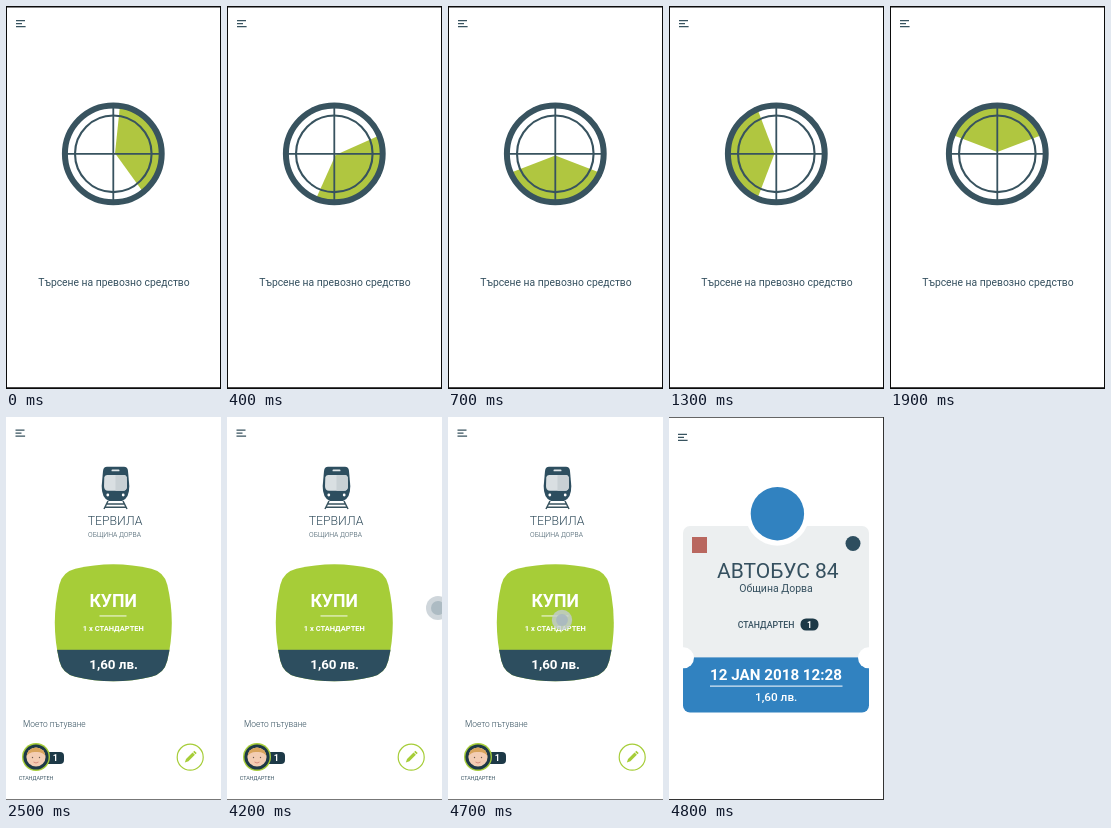
Write an HTML page that moves like this. It is 215x383 px and loops after 6000 ms.

```html
<!DOCTYPE html>
<html lang="bg">
<head>
<meta charset="utf-8">
<title>Билет за превоз</title>
<style>
  html, body { margin: 0; width: 100%; height: 100%; overflow: hidden; background: #fff; }
  svg { display: block; width: 100vw; height: 100vh; }
  text { font-family: Roboto, Inter, sans-serif; text-anchor: middle; fill: #35505f; }
  .light { font-weight: 300; }
  .mid { font-weight: 500; }
  .bold { font-weight: 700; }
  .white { fill: #fff; }
  .left { text-anchor: start; }
  .dark { fill: #2d4e5f; }
  .deep { fill: #1d3947; }
  .green { fill: #a6cd38; }
  .blue { fill: #3182c0; }
  .line { fill: none; stroke: #38535f; }
</style>
</head>
<body>
<svg viewBox="0 0 215 383">
  <defs>
    <path id="menu" d="M0 0H9M0 3H6M0 6H9.6" class="line" stroke-width="1.3"/>
    <clipPath id="dial"><circle cx="107.3" cy="147.8" r="46.5"/></clipPath>
    <clipPath id="buy">
      <path transform="translate(107.3 205.7)" d="M-38 -54Q0 -63 38 -54Q50.9 -50.9 54 -38Q63 0 54 38Q50.9 50.9 38 54Q0 63 -38 54Q-50.9 50.9 -54 38Q-63 0 -54 -38Q-50.9 -50.9 -38 -54Z"/>
    </clipPath>
    <clipPath id="card"><rect x="14" y="109" width="186" height="186.5" rx="7"/></clipPath>
    <clipPath id="face"><circle cx="30" cy="340" r="9.6"/></clipPath>
  </defs>

  <g id="search">
    <use href="#menu" x="10" y="14.7"/>
    <g clip-path="url(#dial)"><path id="wedge" fill="#b0c640"/></g>
    <g class="line">
      <path d="M61 147.8H154M107.3 101V195" stroke-width="1.8"/>
      <circle cx="107.3" cy="147.8" r="38.3" stroke-width="2.1"/>
      <circle cx="107.3" cy="147.8" r="48.4" stroke-width="6"/>
    </g>
    <text x="108" y="280" font-size="10.35">Търсене на превозно средство</text>
    <path d="M0 0H215V383H0ZM1 1.5V381.3H214V1.5Z" fill-rule="evenodd" fill="#0b0b0b"/>
  </g>

  <g id="order">
    <use href="#menu" x="9.5" y="13.2"/>
    <g>
      <path d="M102 84L98 92M117 84L121 92M100.5 87H118.5M98.5 90.3H120.5" class="line" stroke-width="1.5"/>
      <path class="dark" d="M101 49.8H118Q121.5 49.8 122 54L123.3 69Q123.5 81 116 84H103Q95.5 81 95.7 69L97 54Q97.5 49.8 101 49.8Z"/>
      <rect x="105.5" y="52.5" width="8" height="1.8" rx=".9" fill="#dfe5e8"/>
      <path d="M101 58H118Q120.5 58 120.7 60.5L121 69Q121 73.5 117 73.8H102Q98 73.5 98 69L98.3 60.5Q98.5 58 101 58Z" fill="#d9dfe2"/>
      <path d="M109.5 58H118Q120.5 58 120.7 60.5L121 69Q121 73.5 117 73.8H109.5Z" fill="#c8d0d4"/>
      <circle cx="101.8" cy="78" r="1.4" fill="#fff"/>
      <circle cx="117.2" cy="78" r="1.4" fill="#fff"/>
    </g>
    <text class="light" x="109" y="108" font-size="12.3">ТЕРВИЛА</text>
    <text class="light" x="108.5" y="119.5" font-size="6.8">ОБЩИНА ДОРВА</text>

    <g clip-path="url(#buy)">
      <rect class="green" x="48" y="146" width="120" height="120"/>
      <rect class="dark" x="48" y="232.8" width="120" height="34"/>
    </g>
    <text class="bold white" x="107.2" y="190" font-size="17.7">КУПИ</text>
    <rect class="white" x="93.5" y="198.5" width="27" height=".9"/>
    <text class="bold white" x="107.3" y="214" font-size="7.5">1 х СТАНДАРТЕН</text>
    <text class="bold white" x="107.6" y="251.7" font-size="13.4">1,60 лв.</text>

    <text class="light left" x="17" y="310" font-size="8.4">Моето пътуване</text>
    <rect class="deep" x="36" y="335" width="22" height="12" rx="4"/>
    <text class="bold white" x="49.3" y="344.4" font-size="9">1</text>
    <circle class="green" cx="30" cy="340" r="14"/>
    <circle class="deep" cx="30" cy="340" r="12.6"/>
    <g clip-path="url(#face)">
      <rect x="19" y="329" width="22" height="22" fill="#f3cdb3"/>
      <path d="M20 340Q23 334.5 30 335Q37 334.5 40 340V328H20Z" fill="#d8a45c"/>
      <circle cx="26.5" cy="340.5" r=".7" fill="#6b5a50"/>
      <circle cx="33.5" cy="340.5" r=".7" fill="#6b5a50"/>
      <path d="M27.5 345Q30 347 32.5 345" fill="none" stroke="#d07f74" stroke-width=".8"/>
    </g>
    <text x="30" y="363" font-size="5.3">СТАНДАРТЕН</text>
    <circle cx="184.2" cy="340.2" r="13" fill="#fff" stroke="#a6cd38" stroke-width="1.2"/>
    <path class="green" transform="translate(184.2 340.2) rotate(45)" d="M-1.7 -7.5H1.7V-5.8H-1.7ZM-1.7 -5H1.7V4.2L0 7.6L-1.7 4.2Z"/>
    <rect y="382" width="215" height="1" fill="#777"/>
    <g id="touch">
      <circle r="12" fill="#c3ccd2" opacity=".8"/>
      <circle r="7" fill="#a9b8c0" opacity=".9"/>
    </g>
  </g>

  <g id="ticket">
    <use href="#menu" x="9" y="17.4"/>
    <g clip-path="url(#card)">
      <rect x="14" y="109" width="186" height="133" fill="#eceff0"/>
      <rect class="blue" x="14" y="240.4" width="186" height="56"/>
    </g>
    <g class="white">
      <circle cx="14.5" cy="240.8" r="10.5"/>
      <circle cx="199.5" cy="240.8" r="10.5"/>
      <circle cx="108.4" cy="96.7" r="32"/>
    </g>
    <circle class="blue" cx="108.4" cy="96.7" r="26.7"/>
    <rect x="23" y="120" width="15" height="16" fill="#b9675f"/>
    <circle class="dark" cx="184" cy="126.5" r="7.5"/>
    <text x="108.8" y="160.7" font-size="21">АВТОБУС 84</text>
    <text x="107" y="175" font-size="10.5">Община Дорва</text>
    <text class="mid" x="97" y="211.2" font-size="8.7">СТАНДАРТЕН</text>
    <rect class="deep" x="131.5" y="201.4" width="18" height="12.2" rx="5.5"/>
    <text class="bold white" x="140.5" y="210.6" font-size="8.5">1</text>
    <text class="bold white" x="107" y="263.2" font-size="15.2">12 JAN 2018 12:28</text>
    <rect class="white" x="41" y="268.6" width="132.5" height="1"/>
    <text class="mid white" x="107.2" y="283.7" font-size="11.8">1,60 лв.</text>
    <path d="M0 0H215V383H0V382H214V.8H0Z" fill="#333"/>
  </g>
</svg>
<script>
  const $ = id => document.getElementById(id);
  const LOOP = 6000, STEP = 100;
  const scenes = [["search", 0, 2500], ["order", 2500, 4800], ["ticket", 4800, LOOP]];

  // Sector pointing along deg, clockwise from the top, its tip just off the hub
  function sector(deg) {
    const polar = (d, r) => {
      const a = d * Math.PI / 180;
      return [107.3 + r * Math.sin(a), 147.8 - r * Math.cos(a)];
    };
    const rim = [-67.5, -34, 0, 34, 67.5].map(d => polar(deg + d, 60));
    return "M" + [polar(deg, 1.8), ...rim].map(p => p.join(" ")).join("L") + "Z";
  }

  function draw(t) {
    for (const [id, from, to] of scenes)
      $(id).style.display = t >= from && t < to ? "" : "none";
    $("wedge").setAttribute("d", sector(75 + t * 0.15));

    // The touch glides in from the right, then presses the button
    const p = Math.min(Math.max((t - 4200) / 400, 0), 1);
    const ease = p * p * (3 - 2 * p);
    const size = t >= 4700 ? 0.85 : 1;
    $("touch").style.display = t >= 4200 ? "" : "none";
    $("touch").setAttribute("transform",
      `translate(${211 - 97 * ease} ${191 + 12 * ease}) scale(${size})`);
  }

  const start = performance.now();
  function tick() {
    const t = (performance.now() - start) % LOOP;
    draw(Math.floor(t / STEP) * STEP);
    requestAnimationFrame(tick);
  }
  tick();
</script>
</body>
</html>
```
